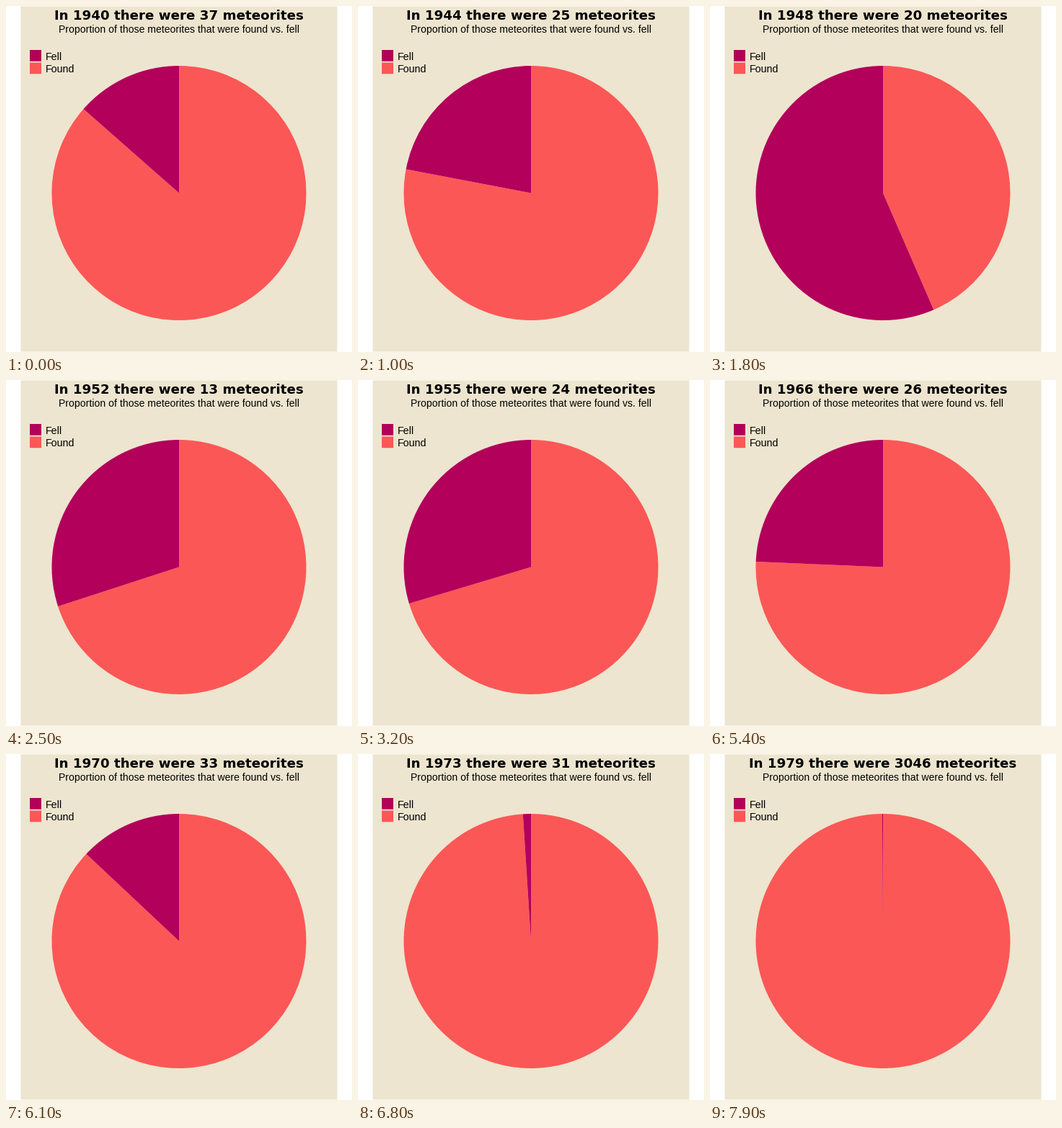
Animation of 480x480 px, one loop 8 s. Source, as a matplotlib script:

```python
import random

import matplotlib.pyplot as plt
import numpy as np
from matplotlib.animation import FuncAnimation
from matplotlib.patches import Rectangle, Wedge

SIZE, DPI = 480, 100
SAND, FELL, FOUND = "#EDE5CF", "#B2005B", "#FB5756"
CENTER, RADIUS = (240, 259.5), 176.5
YEARS = range(1940, 1980)

# key years; the years between them are interpolated
TOTALS = {1940: 37, 1948: 20, 1954: 9, 1955: 24, 1959: 16, 1966: 26,
          1973: 31, 1974: 691, 1978: 286, 1979: 3046}
FELL_SHARES = {1940: 5 / 37, 1943: 0.4, 1945: 0.22, 1949: 13 / 23, 1952: 0.3,
               1953: 0.3, 1955: 0.21, 1956: 8 / 27, 1957: 0.2, 1959: 3 / 8,
               1960: 1 / 6, 1963: 0.21, 1966: 0.16, 1967: 9 / 37, 1970: 0.13,
               1973: 0.15, 1974: 7 / 691, 1979: 0.001}


def between(keys, year):
    return float(np.interp(year, list(keys), list(keys.values())))


rng = random.Random(4)
totals = [round(between(TOTALS, y) * (1 if y in TOTALS else rng.uniform(0.8, 1.2)))
          for y in YEARS]
shares = [between(FELL_SHARES, y) for y in YEARS]

fig = plt.figure(figsize=(SIZE / DPI, SIZE / DPI), dpi=DPI, facecolor="white")
ax = fig.add_axes([0, 0, 1, 1])
ax.set_xlim(0, SIZE)
ax.set_ylim(SIZE, 0)
ax.axis("off")


def box(x, y, w, h, color):
    ax.add_patch(Rectangle((x, y), w, h, facecolor=color, linewidth=0, snap=False))


def pie_slice(color):
    return ax.add_patch(Wedge(CENTER, RADIUS, -90, 270, facecolor=color, linewidth=0))


def label(x, y, text, px, font="Liberation Sans", **style):
    return ax.text(x, y, text, fontsize=px * 72 / DPI, family=font,
                   color="black", va="baseline", **style)


box(20.5, 0.5, 439, 479, SAND)
found, fell = pie_slice(FOUND), pie_slice(FELL)

title = label(240, 19, "", 18.25, "DejaVu Sans", weight="bold", ha="center")
label(240, 37, "Proportion of those meteorites that were found vs. fell", 14, ha="center")
for y, color, name in ((61, FELL, "Fell"), (78.5, FOUND, "Found")):
    box(33, y, 16, 15.7, color)
    label(55, round(y + 13.7), name, 14.2)


def draw(i):
    pie = i // 2
    named = max(0, (i - 1) // 2)  # the title follows the pie one step later
    edge = 270 - 360 * shares[pie]
    fell.set_theta1(edge)
    found.set_theta2(edge)
    title.set_text(f"In {YEARS[named]} there were {totals[named]} meteorites")
    return found, fell, title


anim = FuncAnimation(fig, draw, frames=2 * len(YEARS), interval=100,
                     repeat=True, repeat_delay=0)
plt.show()
```
